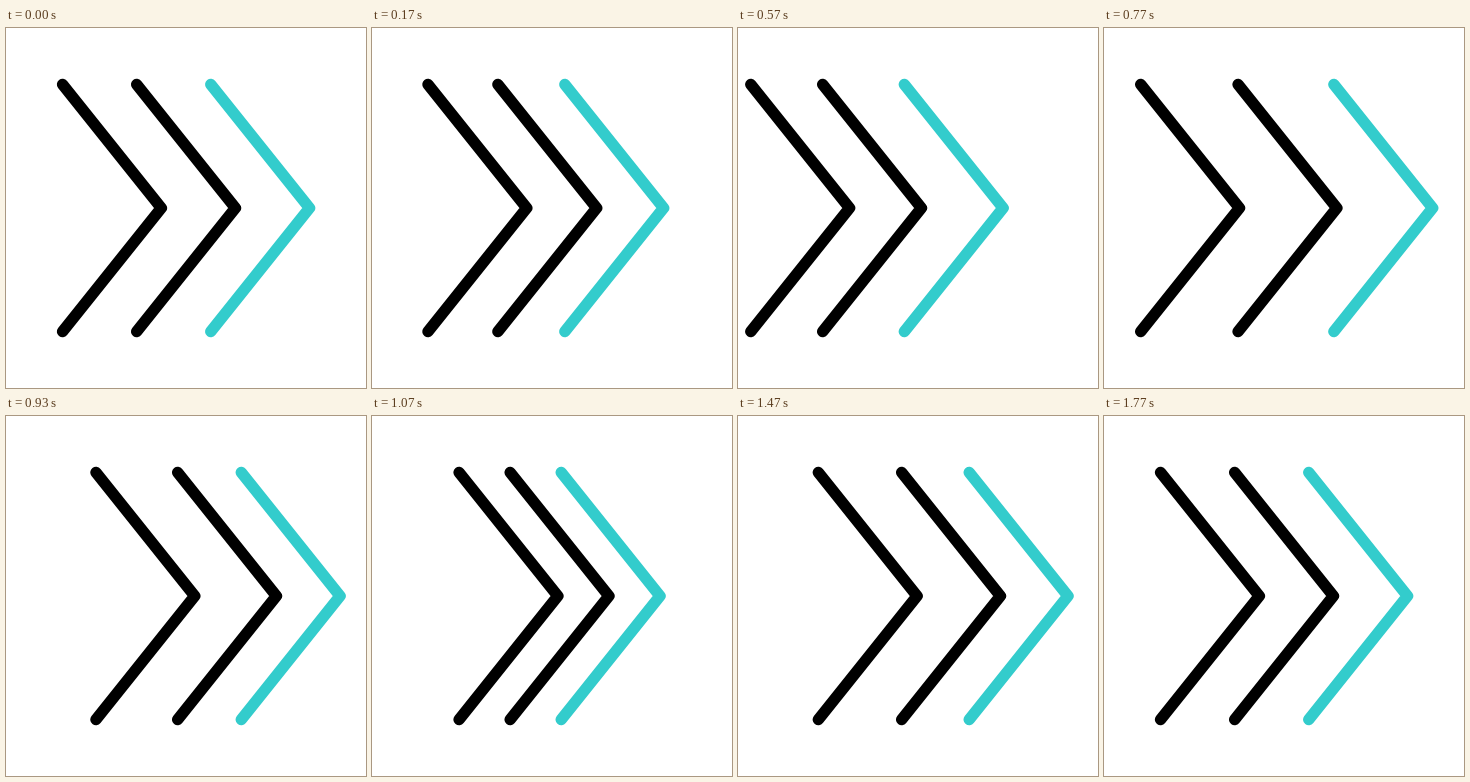
Write an HTML page that moves like this. It is 360 by 360 pixels and loops after 2 s.

```html
<!DOCTYPE html>
<html lang="en">
<head>
<meta charset="utf-8">
<title>Chevrons</title>
<style>
  html, body { margin: 0; height: 100%; overflow: hidden; background: #fff; }
  svg { display: block; width: 100vw; height: 100vh; }
  path { fill: none; stroke: #000; stroke-width: 11.5; stroke-linecap: round; stroke-linejoin: round; }
  path:last-child { stroke: #33cccc; }
</style>
</head>
<body>
<svg viewBox="0 0 360 360">
  <path d="M56.6 56.5l98.7 123.5l-98.7 123.5"/>
  <path d="M130.7 56.5l98.7 123.5l-98.7 123.5"/>
  <path d="M204.8 56.5l98.7 123.5l-98.7 123.5"/>
</svg>
<script>
const LOOP = 2000, FPS = 30, DELAY = 2;
// [tick, horizontal offset]
const keys = [[0, 0], [15, -46], [26, 41], [34, -26], [42, 33], [49, 0]];
const arrows = [...document.querySelectorAll('path')];

function offset(tick) {
  if (tick <= 0) return 0;
  const i = keys.findIndex(([end]) => tick < end);
  if (i < 0) return 0;
  const [t0, x0] = keys[i - 1], [t1, x1] = keys[i];
  const s = (tick - t0) / (t1 - t0);
  return x0 + (x1 - x0) * s * s * (3 - 2 * s);
}

function draw() {
  // Steps at 30 per second, timed in hundredths of a second
  const time = Math.floor(performance.now() % LOOP / 10) * 10;
  const tick = Math.floor((time + 4) * FPS / 1000);
  arrows.forEach((arrow, i) => {
    arrow.setAttribute('transform', `translate(${offset(tick - (2 - i) * DELAY)})`);
  });
  requestAnimationFrame(draw);
}
draw();
</script>
</body>
</html>
```
